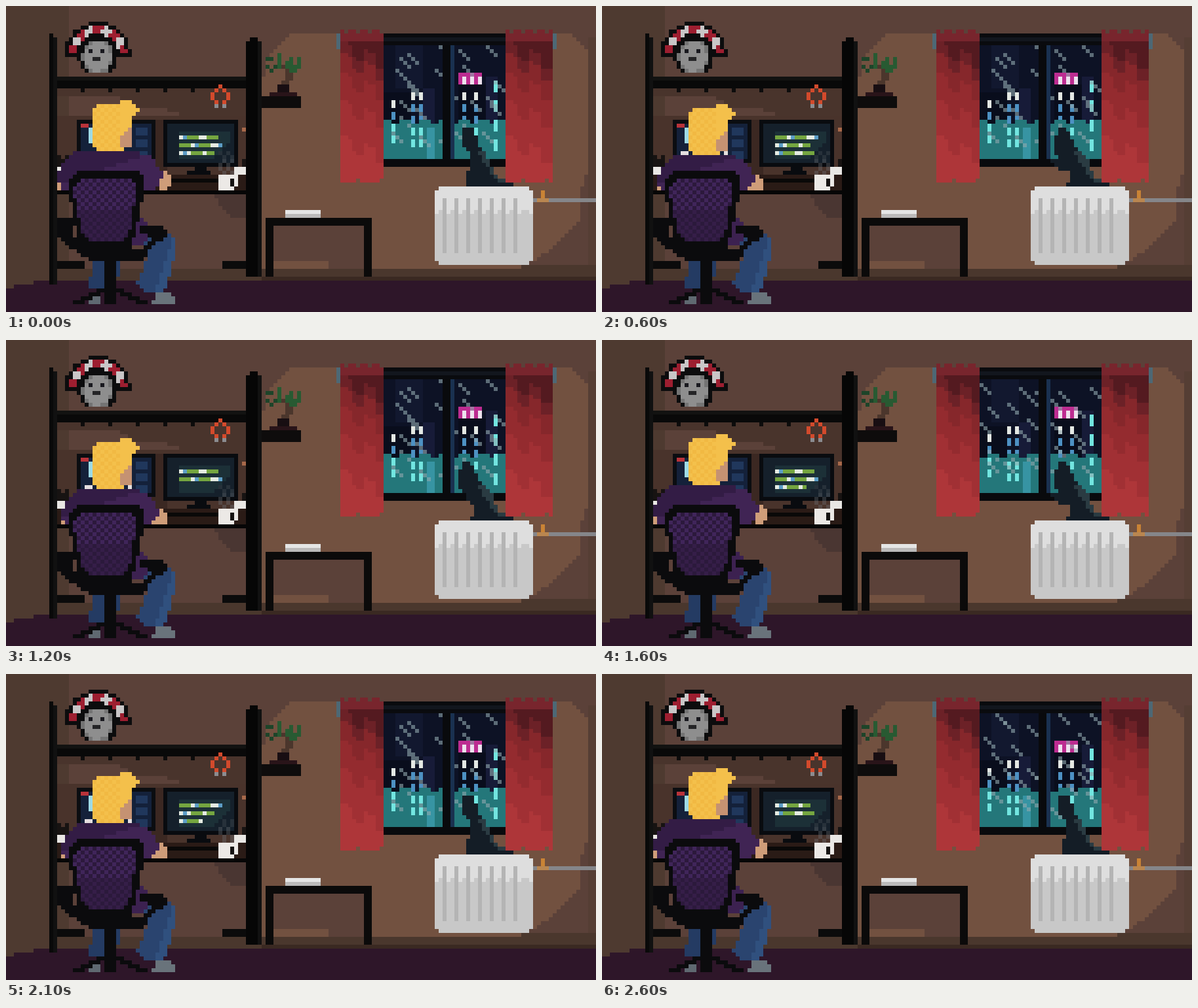
These frames come from a looping animation (900 px wide and 468 px high, 2.7 s). An HTML page with a canvas:

```html
<!DOCTYPE html>
<html lang="en">
<head>
<meta charset="utf-8">
<title>Rainy evening desk</title>
<style>
html, body { margin: 0; width: 100%; height: 100%; overflow: hidden; background: #2e1629; }
canvas { display: block; }
</style>
</head>
<body>
<canvas id="stage" width="900" height="468"></canvas>
<script>
const CELL = 6, LOOP = 2700, STEP = 100;
const stage = document.getElementById('stage').getContext('2d');
let ctx = stage;

const hash = n => { const v = Math.sin(n * 12.9898) * 43758.5453; return v - Math.floor(v); };
const checker = (x, y) => (x + y) % 2 === 0;

// All drawing is in cells of the pixel grid.
function rect(color, x, y, w = 1, h = 1) {
  ctx.fillStyle = color;
  ctx.fillRect(x * CELL, y * CELL, w * CELL, h * CELL);
}

// Colours each cell of a box by a rule; no colour leaves the cell alone.
function paint(x0, y0, w, h, shade) {
  for (let y = y0; y < y0 + h; y++) {
    for (let x = x0; x < x0 + w; x++) {
      const color = shade(x, y);
      if (color) rect(color, x, y);
    }
  }
}

// Fills the cells whose centre lies in the polygon "x,y x,y ...".
// The colour may be a rule; move changes the points first.
function poly(color, points, move = p => p) {
  const p = points.split(' ').map(s => move(s.split(',').map(Number)));
  const ys = p.map(q => q[1]);
  for (let y = Math.floor(Math.min(...ys)); y < Math.max(...ys); y++) {
    const cy = y + 0.5, hits = [];
    p.forEach(([x1, y1], i) => {
      const [x2, y2] = p[(i + 1) % p.length];
      if ((y1 <= cy) !== (y2 <= cy)) hits.push(x1 + (cy - y1) / (y2 - y1) * (x2 - x1));
    });
    hits.sort((a, b) => a - b);
    for (let i = 0; i + 1 < hits.length; i += 2) {
      const a = Math.round(hits[i]), b = Math.round(hits[i + 1]);
      if (typeof color === 'string') rect(color, a, y, b - a);
      else paint(a, y, b - a, 1, color);
    }
  }
}

function layer(...parts) {
  const c = document.createElement('canvas');
  c.width = 900; c.height = 468;
  ctx = c.getContext('2d');
  parts.forEach(draw => draw());
  ctx = stage;
  return c;
}

function drawWall() {
  rect('#5b4139', 0, 0, 150, 78);
  rect('#4e3a30', 0, 0, 16, 72);
  poly('#725140', '72,7 144,7 148,12 148,41 146,47 146,54 141,60 134,65 131,67 65,67 65,20 67,12');
  rect('#5b4139', 68, 56, 23, 9);
  rect('#5b4139', 82, 65, 9, 2);
  rect('#553e34', 148, 8, 2, 59);
  rect('#4a372d', 0, 67, 150, 3);
  rect('#4a372d', 131, 66, 19, 1);
  rect('#4e3a30', 0, 67, 11, 5);
  rect('#3a2922', 65, 69, 85, 1);
  poly('#2e1629', '0,72 2,72 2,71 7,71 7,70 150,70 150,78 0,78');
}

function drawShelf() {
  poly('#49342c', '13,21 61,21 61,28 45,28 40,26 33,26 28,23 13,23');
  rect('#49332b', 13, 28, 48, 17);
  rect('#3b2822', 37, 29, 4, 14);
  rect('#a8694a', 60, 31);
  rect('#2a1b16', 13, 43, 48, 4);
  poly('#4a3632', '53,48 61,48 61,54 57,54 54,51');
  rect('#090909', 11, 7, 1, 64);
  rect('#111', 12, 8, 1, 63);
  rect('#090909', 13, 18, 48, 3);
  rect('#121211', 13, 18, 48, 1);
  for (let x = 19; x < 50; x += 7) rect('#0d0c0c', x, 21);
  rect('#060606', 13, 47, 48, 1);
  rect('#0b0b0b', 13, 65, 7, 2);
  rect('#0b0b0b', 55, 65, 6, 2);
  rect('#060606', 62, 8, 2, 61);
  rect('#060606', 61, 9, 3, 60);
  rect('#111', 64, 9, 1, 60);
}

// A grey face under a striped half ring.
function drawMask() {
  const black = '#0c0c0d';
  paint(15, 4, 17, 13, (x, y) => {
    const u = x - 22.8, v = y - 12;
    const face = Math.hypot(u / 3.9, (v - 0.3) / 4.6);
    if (face < 1 && y > 8) return face > 0.85 ? '#747474' : '#8e8e8e';
    if (Math.hypot(u / 5, (v - 0.3) / 5.6) < 1) return black;
    const r = Math.hypot(u, v);
    if (y > 12 || r > 8.4) return null;
    if (r < 5.4 || r > 7.4 || y > 11) return black;
    const stripe = Math.floor(Math.atan2(-v, u) / Math.PI * 9);
    return stripe % 2 ? '#c9c6c7' : '#9d1e30';
  });
  rect('#19191f', 21, 11); rect('#19191f', 24, 11);
  rect('#242426', 22, 13, 2, 1);
}

function drawPliers() {
  paint(52, 20, 5, 6, (x, y) => {
    const side = Math.abs(x - 54);
    if (y === 25) return side === 1 && '#8b8c90';
    return side === [0, 1, 2, 2, 1][y - 20] && '#d34a2c';
  });
}

function drawDesk() {
  rect('#0b0d11', 18, 29, 20, 11);
  rect('#14213a', 19, 30, 18, 9);
  rect('#b9333a', 19, 30, 2, 1);
  rect('#9fdbe6', 21, 31, 1, 4);
  for (let y = 31; y < 39; y += 3) rect('#20375c', 33, y, 3, 2);

  rect('#090b0f', 40, 29, 19, 12);
  rect('#15202b', 41, 30, 17, 10);
  poly('#1c3037', '44,32 57,32 57,35 52,39 44,39');
  rect('#090b0f', 48, 41, 3, 1);
  rect('#090b0f', 46, 42, 6, 1);
  rect('#0a0908', 41, 44, 13, 1);

  rect('#e9e7e4', 58, 41, 3, 2);
  rect('#171312', 60, 39, 1, 2);
  rect('#e9e7e4', 13, 41, 2, 2);
  rect('#171312', 13, 38); rect('#171312', 15, 38);
  rect('#171312', 13, 39, 3, 2);
  rect('#ece9e6', 54, 43, 4, 4);
  rect('#ece9e6', 58, 43, 1, 3);
  rect('#151211', 57, 44, 1, 2);
}

function drawPlant() {
  rect('#0e0c0c', 65, 23, 10, 3);
  rect('#291419', 67, 22, 7, 1);
  rect('#180e12', 69, 20, 3, 2);
  poly('#4b362c', '70,15 72,15 73,18 72,20 70,20 71,18');
  paint(66, 12, 9, 5, (x, y) => {
    const inside = Math.hypot((x - 70) / 4.8, (y - 14.3) / 2.8) < 1;
    return inside && hash(x * 7 + y * 31) > 0.45 && (x < 69 ? '#1d4429' : '#285a32');
  });
}

function drawCity() {
  rect('#0d1225', 96, 10, 31, 29);
  rect('#12182f', 99, 10, 7, 11);
  rect('#090d1c', 96, 22, 7, 8);
  rect('#171b38', 106, 21, 3, 9);
  rect('#090d1c', 115, 20, 7, 10);
  rect('#171b38', 122, 18, 3, 12);
  rect('#24777a', 96, 30, 31, 9);
  rect('#3794a3', 107, 31, 2, 8);

  const cyan = '#72e5e0';
  for (const x of [98, 103, 105, 116, 119]) {
    for (let y = x === 98 ? 24 : 22; y < 36; y += 3) {
      rect(y < 25 ? '#e4e8e4' : y < 29 ? '#4d91c3' : cyan, x, y, 1, 2);
    }
  }
  for (let y = 19; y < 37; y += 5) rect(cyan, 124, y, 1, 3);

  paint(115, 17, 6, 3, x => x % 2 ? '#bd2c91' : '#eee2ee');
  rect('#bd2c91', 115, 17, 6, 1);
}

function drawFrame() {
  rect('#0a0b0e', 96, 7, 31, 3);
  rect('#12161e', 96, 8, 31, 1);
  rect('#090a0d', 111, 10, 2, 29);
  rect('#1a3150', 113, 10, 1, 29);
  rect('#090a0d', 96, 39, 31, 2);
}

// Cloth gets lighter downwards in slanted bands that break at each fold.
function drawCurtain(x0, w) {
  const tones = ['#541a20', '#6c2127', '#86272b', '#942b2f', '#a13034', '#ae3639'];
  paint(x0, 6, w, 39, (x, y) => {
    const i = x - x0;
    if (y === 6) return i % 3 !== 1 && '#78252d';
    if (y < 9) return '#78252d';
    if (y === 44 && i % 6 === 4) return null;
    const fold = i % 6 < 3 ? 1.5 : -1.5;
    const depth = y - 9 + fold - i * 0.4;
    return tones[Math.max(0, Math.min(5, Math.floor(Math.sqrt(Math.max(0, depth)))))];
  });
}

function drawCurtains() {
  for (const [arm, end] of [[84, 84], [138, 139]]) {
    rect('#4d6875', arm, 7, 2, 1);
    rect('#4d6875', end, 8, 1, 3);
  }
  drawCurtain(85, 11);
  drawCurtain(127, 12);
}

function drawFurniture() {
  rect('#0b0a0a', 66, 54, 27, 2);
  rect('#0b0a0a', 66, 56, 2, 13);
  rect('#0b0a0a', 91, 56, 2, 13);
  rect('#e5e5e5', 71, 52, 9, 1);
  rect('#bbbaba', 71, 53, 9, 1);

  paint(109, 46, 25, 20, (x, y) => {
    if ((x === 109 || x === 133) && (y === 46 || y === 65)) return null;
    if (x % 3 === 0 && x > 110 && x < 131 && y > 48 && y < 63) return '#b4b4b4';
    return y < 52 || (y === 52 && x % 3 === 1) ? '#dedede' : '#c8c8c8';
  });
  rect('#85868a', 134, 49, 16, 1);
  rect('#c98335', 136, 47, 1, 2);
  rect('#b98650', 135, 49, 3, 1);
}

function drawChair() {
  const black = '#0b0b0d', jeans = '#2a446f';
  poly('#243b63', '22,65 29,65 28,72 21,72');
  poly((x, y) => x + y / 3 > 61.5 ? '#30507e' : jeans,
    '35,60 38,58 42,58 43,60 43,63 42,67 40,73 35,73 33,71 35,67 36,63');
  poly('#3c2150', '33,53 36,56 36,59 34,61 32,61');
  rect('#5f6971', 21, 74, 3, 2);
  poly('#69737b', '38,73 41,73 43,74 43,76 37,76');

  poly(black, '18,42 33,42 35,44 35,47 33,58 31,63 20,63 18,59 16,47 16,44');
  poly((x, y) => checker(x, y) ? '#2c193c' : y < 52 ? '#40255a' : '#351e48',
    '19,44 32,44 33,46 32,56 30,60 21,60 19,57 17,46');
  poly(black, '20,62 34,62 36,63 34,65 22,65');
  rect(black, 13, 54, 4, 4);
  poly(black, '13,58 16,58 22,63 22,65 15,61');
  poly(black, '34,56 40,56 41,58 40,60 38,60 35,64 33,64 37,59 34,58');

  rect(black, 25, 64, 3, 12);
  for (let i = 0; i < 4; i++) {
    rect(black, 23 - 2 * i, 72 + i, 3, 1);
    rect(black, 27 + 2 * i, 72 + i, 3, 1);
  }
}

function drawPerson(down) {
  const lower = down ? 1 : 0, skin = '#cf9d79';
  // Leaning down also pulls the elbows in.
  const lean = ([x, y]) => [27.5 + (x - 27.5) * (1 - 0.07 * lower), Math.min(47, y + lower)];
  const nod = ([x, y]) => [x, y + lower];

  poly(skin, '13,43 15,43 15,47 13,47', lean);
  poly(skin, '38,42 40,42 42,44 42,46 40,47 38,46', lean);
  poly((x, y) => x + 3 * y < 148 ? '#331c45' : '#402454',
    '18,37 32,37 36,38 38,40 40,43 39,45 37,47 14,47 13,43 15,39', lean);
  if (down) { rect('#e5dfdf', 20, 37, 2, 1); rect('#e5dfdf', 31, 37); }
  poly((x, y) => x > 28 || checker(x, y) ? '#f4c04b' : '#f1b943',
    '22,26 24,25 28,25 29,24 32,24 33,26 34,26 32,28 32,32 30,34 30,37 23,37 22,35', nod);
  poly('#c59272', '30,32 32,31 32,35 31,36 29,36 29,34', nod);
}

function drawCat(bent, tail) {
  const black = '#141d26', fur = '#2a3b42';
  const coat = (x, y) => y > 36 && x > 95.5 + y * 0.65 && y < 45 ? fur : black;
  if (bent) {
    if (tail) poly(black, '113,39 117,39 120,42 116,42');
    poly(coat, '116,31 119,32 120,36 123,38 125,44 129,45 129,46 118,46 119,43 115,37 115,34');
  } else {
    poly(coat, '116,31 119,31 120,36 122,38 125,44 129,45 129,46 117,46 118,37 116,36');
  }
}

// Scattered diagonal strokes, one jittered stroke to each square of the window.
function drawRain(state) {
  const isGlass = x => x < 111 || (x > 113 && x < 127);
  for (let row = 0; row < 5; row++) {
    for (let col = 0; col < 5; col++) {
      const seed = state * 50 + row * 5 + col + 1;
      const x = 96 + col * 6 + Math.floor(hash(seed) * 5);
      const y = 10 + row * 5 + Math.floor(hash(seed + 0.5) * 5);
      for (let k = 0; k < 3; k++) {
        if (isGlass(x + k)) rect('rgba(145,168,174,.6)', x + k, y + k);
      }
    }
  }
  for (let x = 96; x < 127; x++) {
    if (isGlass(x) && (x + state * 2) % 5 < 3) rect('#24777a', x, 29);
  }
}

// Three source lines repeat; each scroll starts typing the next one.
const CODE = ['wbgggwwggg', 'gggwbgggwwb', 'wbwgggwgg'];
const INK = { w: '#e5ebe2', b: '#5c9dc6', g: '#75a640' };
const SCROLLS = [0, 1, 7, 12, 18, 26];
function drawCode(n) {
  const first = SCROLLS.findLastIndex(start => start <= n);
  for (let row = 0; row < 3; row++) {
    const line = CODE[(first + row) % 3];
    const typed = row < 2 || n === 0 ? line.length : (n - SCROLLS[first]) * 2;
    [...line].slice(0, typed).forEach((c, i) => rect(INK[c], 44 + i, 33 + row * 2));
  }
}

function drawSteam(n) {
  for (const x of [54, 56]) {
    for (let y = 37; y < 43; y++) {
      rect(`rgba(110,114,120,${y < 39 ? 0.2 : 0.35})`, x + ((y + n) % 4 < 2 ? 0 : 1), y);
    }
  }
}

const room = layer(drawWall, drawShelf, drawMask, drawPliers, drawDesk, drawPlant, drawCity);
const front = layer(drawFrame, drawCurtains, drawFurniture);
const chair = layer(drawChair);

function render(time) {
  const n = Math.floor((time % LOOP) / STEP);
  stage.drawImage(room, 0, 0);
  drawRain(n % 3);
  stage.drawImage(front, 0, 0);
  drawCode(n);
  drawSteam(n);
  drawCat(n >= 3 && n < 19, n % 10 >= 5 && n % 10 < 9);
  drawPerson(n % 8 >= 4);
  stage.drawImage(chair, 0, 0);
}

let began;
function tick(now) {
  began ??= now;
  render(now - began);
  requestAnimationFrame(tick);
}
render(0);
requestAnimationFrame(tick);
</script>
</body>
</html>
```
